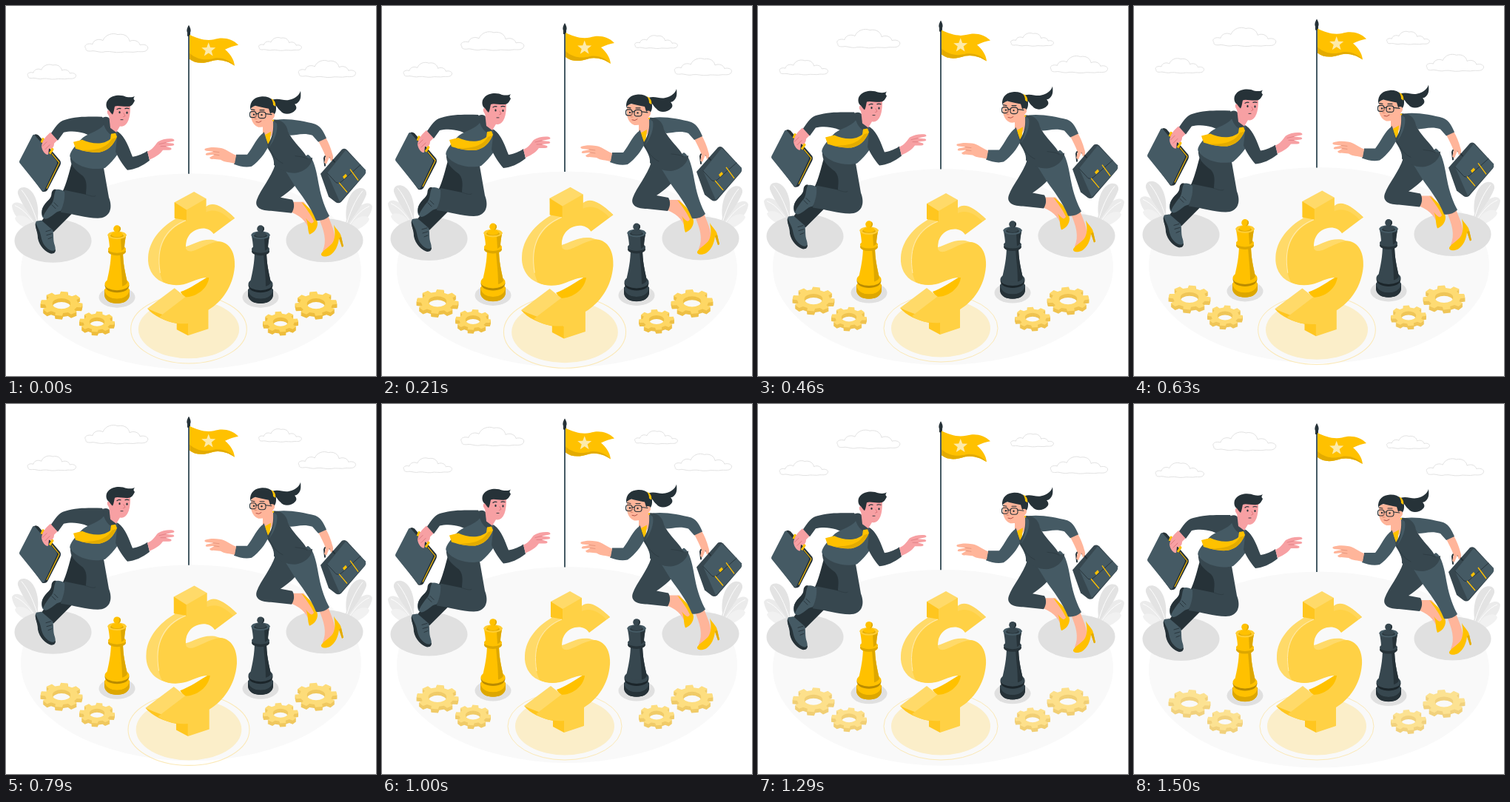
Write an HTML page that moves like this. It is 500x500 px and loops after 1540 ms.

```html
<!DOCTYPE html>
<html lang="en">
<head>
<meta charset="utf-8">
<title>Business race</title>
<style>
html,body{margin:0;width:100%;height:100%;overflow:hidden;background:#fff}
svg{display:block;width:100%;height:100%}
.ink{fill:#263238}.dark{fill:#37474f}.mid{fill:#455a64}
.gold{fill:#ffc100}.deep{fill:#e3ab00}
.his{fill:#f7a0a3}.her{fill:#ffb59a}
.line{fill:none;stroke:#263238;stroke-width:.9;stroke-linecap:round;stroke-linejoin:round}
.cloud{fill:#fff;stroke:#dedede;stroke-width:.9;vector-effect:non-scaling-stroke}
.shade{fill:#e0e0e0}
.y{--a:#ffc100;--b:#dda700;--c:#b98b00;--d:#ffcd33}
.k{--a:#37474f;--b:#263238;--c:#1b252a;--d:#455a64}
</style>
</head>
<body>
<svg viewBox="0 0 500 500">
<defs>
  <path id="cloud" class="cloud" d="M2 20C-2 15 5 12 11 14C12 8 20 6 25 9C28 1 38-2 45 1C54-1 60 4 61 10C67 7 74 10 75 15C82 13 88 17 85 21C83 25 76 24 72 24C64 26 56 23 49 25C41 26 36 23 28 24C22 26 16 23 11 23C6 24 1 23 2 20Z"/>
  <g id="plant">
    <path fill="#ebebeb" d="M42 303C25 300 9 284 8 270C11 263 21 266 27 272C36 280 42 291 45 300Z"/>
    <path fill="#f1f1f1" d="M44 308C30 304 13 294 12 287C16 280 28 284 34 291Z"/>
    <path fill="#e3e3e3" d="M47 303C39 291 22 271 16 254C15 246 23 243 30 247C41 254 45 272 43 288Z"/>
    <path fill="none" stroke="#fff" stroke-width=".9" d="M21 249C31 261 39 279 45 302M12 270C25 275 36 290 44 304"/>
  </g>
  <g id="king">
    <ellipse class="shade" cy="394" rx="24.5" ry="14"/>
    <path fill="var(--b)" d="M-17 383L-17 391C-16 406 16 406 17 391L17 383Z"/>
    <ellipse cy="385" rx="16.5" ry="11" fill="var(--a)"/>
    <path fill="var(--b)" d="M-16 387C-13 399 13 399 16 387L17 391C15 400 8 402 0 402S-15 400-17 391Z"/>
    <path fill="var(--c)" d="M-16.500 377C-17 391 17 391 16.500 377Z"/>
    <ellipse cy="376" rx="16.500" ry="8.500" fill="var(--a)"/>
    <path fill="var(--a)" d="M-8 330L8 330C8 348 11 360 14 374C9 381-9 381-14 374C-11 360-8 348-8 330Z"/>
    <path fill="var(--b)" d="M4 334L8 332C8 348 11 360 14 374C12 377 10 378 7 379C7 362 5 350 4 334Z"/>
    <ellipse cy="332" rx="12" ry="5.500" fill="var(--b)"/>
    <ellipse cy="329" rx="12" ry="5" fill="var(--a)"/>
    <path fill="var(--a)" d="M-12.500 309C-11 316-10 322-10 328C-6 333 6 333 10 328C10 322 11 316 12.500 309Z"/>
    <path fill="var(--b)" d="M5 314L12.500 309C11 316 10 322 10 328L6 331Z"/>
    <ellipse cy="310" rx="12.500" ry="5.500" fill="var(--d)"/>
    <path fill="var(--b)" d="M-9 311C-7 305 7 305 9 311C6 314-6 314-9 311Z"/>
    <ellipse cy="309" rx="8" ry="3.500" fill="var(--a)"/>
    <circle cy="301.500" r="4.800" fill="var(--a)"/>
    <path fill="var(--b)" d="M1 306C6 305 6 299 3 298C4 302 3 304 1 306Z"/>
  </g>
</defs>

<g id="scene">
  <ellipse cx="250" cy="359" rx="230" ry="132.5" fill="#f9f9f9"/>
  <use href="#cloud" transform="translate(106 38)"/>
  <use href="#cloud" transform="translate(28.5 79.5) scale(.77 .79)"/>
  <use href="#cloud" transform="translate(341 43) scale(.68 .7)"/>
  <use href="#cloud" transform="translate(394.5 74) scale(.91 .91)"/>
  <use href="#plant"/>
  <use href="#plant" transform="matrix(-1 0 0 1 503 1)"/>
  <ellipse class="shade" cx="63.5" cy="317.5" rx="52" ry="29.5"/>
  <ellipse class="shade" cx="430.5" cy="317" rx="52" ry="29.5"/>
  <g id="gears"></g>
  <use href="#king" class="y" x="150"/>
  <use href="#king" class="k" x="344"/>

  <g id="flag">
    <path stroke="#455a64" stroke-width="2" d="M247 36V227"/>
    <path class="ink" d="M247 26C250 31 250 34 249 36L249 41H245V36C244 34 244 31 247 26Z"/>
    <path class="gold" d="M248 39C258 44 270 48 281 45.500C293 42 305 44 314 53C308 54 302 56 296 59C303 65 308 72 309 81C300 75 290 72 280 74C268 78 257 79 248 72Z"/>
    <path class="deep" d="M248 64C258 73 270 74 281 71C292 69 303 74 309 81C300 75 290 72 280 74C268 78 257 79 248 72Z"/>
    <path id="star" fill="#fdeaa9"/>
  </g>

  <g id="man">
    <path class="ink" d="M89 212C85 226 82 240 76 252L48 291L64 306L110 260L118 224Z"/>
    <path class="mid" d="M41 291C37 297 43 304 44 313C45 323 53 331 60 334C66 336 68 331 66 324C63 316 65 309 63 303L48 290Z"/>
    <path class="ink" d="M40 293C39 300 43 305 43 314C45 325 54 333 61 335C66 335 67 332 67 329C64 333 59 331 54 326C47 319 48 310 45 304Z"/>
    <path class="line" d="M54 305L61 303M55 310L62 308M57 315L62 313"/>
    <path class="dark" d="M87 203C86 215 93 222 104 230C111 238 108 248 108 255L79 249L74 279C91 281 108 287 124 287C140 287 145 274 139 259L132 219Z"/>
    <path class="line" style="opacity:.45" d="M108 255C112 256 118 259 121 257"/>
    <path class="mid" d="M79 251C73 247 65 247 64 252C63 260 53 265 49 274C47 283 49 288 54 288C62 286 66 278 74 277C78 269 80 259 79 251Z"/>
    <path class="ink" d="M65 248C59 252 64 256 58 262C50 269 46 278 50 285C53 278 57 273 62 267C66 260 64 254 68 248Z"/>
    <path class="line" d="M62 269L67 274M65 266L70 271"/>

    <path class="ink" d="M37 175Q40 172 44 175L73 209Q75 212 73 216L56 249Q54 252 49 251L30 225Z"/>
    <path class="mid" d="M36 175Q38 173 40 176L68 209Q70 212 68 215L52 249Q50 252 48 249L19 213Q17 211 19 208Z"/>
    <path fill="none" stroke="#ffc100" stroke-width="1.100" d="M62 200L72 212L55 247"/>
    <path fill="none" stroke="#ffc100" stroke-width="3" stroke-linejoin="round" d="M48 185L50 180L63 194L59 200"/>
    <path class="his" d="M60 171C54 176 49 182 48 190C49 197 54 202 57 201L58 193C64 194 65 189 65 186L71 180Z"/>
    <path class="line" style="stroke:#d8747a" d="M49 190L55 184M53 194L59 188"/>
    <path class="dark" d="M61 172C67 164 71 156 80 154C96 149 114 150 130 150L140 166L122 181C108 170 91 168 78 171L70 182Z"/>

    <path class="mid" d="M132 161C126 169 114 171 104 178C93 189 84 200 87 205C97 219 119 223 134 219C147 208 157 194 160 181C157 173 149 168 141 165Z"/>
    <path class="dark" d="M131 151C136 149 139 151 141 154L150 171L143 175C136 171 131 163 131 151Z"/>
    <path class="gold" d="M142 173L148 172L150 177C145 189 137 196 126 198C112 199 101 195 94 193L91 184L103 181C116 187 132 188 141 180Z"/>
    <path class="deep" d="M149 178C145 189 137 196 126 198C117 198 108 197 101 195C116 196 135 194 143 180Z"/>
    <path class="dark" d="M151 170C162 178 166 192 171 204C179 203 187 199 191 196L194 209C184 217 174 221 164 222C157 214 151 204 148 197Z"/>
    <path class="his" d="M191 197C198 194 201 189 205 184C211 180 220 179 226 180Q229 182 226 183L216 185L226 186Q229 188 225 189L216 190L223 192Q225 195 220 195L212 195C208 201 202 204 194 208Z"/>
    <path class="line" style="stroke:#d8747a;stroke-width:.7" d="M207 187L216 185M209 190L216 190"/>

    <path class="his" d="M139 147L141 165L149 171L155 161Z"/>
    <path class="his" d="M140 136C139 152 147 163 156 163C165 162 168 151 168 135C160 128 147 128 140 136Z"/>
    <path class="his" d="M143 141C138 138 135 143 138 147C139 150 142 151 144 149Z"/>
    <path class="ink" d="M142 145L139 141C135 139 134 131 138 127C145 119 158 121 162 123C167 124 171 124 174 122C172 125 172 126 174 128C172 133 169 136 166 136C159 137 151 134 147 136C146 140 146 143 144 147Z"/>
    <path class="line" style="stroke-width:1.200" d="M150 140Q152 138 155 139M161 139Q163 138 166 139"/>
    <ellipse class="ink" cx="153.500" cy="144" rx="1.100" ry="1.600"/><ellipse class="ink" cx="163.500" cy="144.500" rx="1.100" ry="1.600"/>
    <path class="line" style="stroke:#d8747a" d="M159 145L161 149L158.500 150"/>
    <path class="line" d="M155 154L158 154"/>
  </g>

  <g id="woman">
    <path class="her" d="M385 265L402 265C411 275 419 286 420 294L411 306C407 294 402 286 386 279Z"/>
    <path class="gold" d="M399 265C410 272 420 283 421 294C421 301 416 307 410 309C407 302 409 294 405 287C411 294 414 296 416 291C412 282 405 273 399 265Z"/>
    <path class="dark" d="M364 214C358 233 344 248 339 262C335 273 346 277 358 277L386 280C390 274 390 267 387 262L371 259C383 251 393 242 402 229Z"/>
    <path class="her" d="M422 286L435 283C439 295 446 306 444 318L430 335L428 331C434 318 430 303 422 286Z"/>
    <path class="gold" d="M443 296C446 302 452 306 453 312L456 325L454 326L450 314C449 324 445 332 438 337C432 340 425 339 426 335C429 329 438 326 442 319C446 311 444 303 443 296Z"/>
    <path class="deep" d="M453 312L456 325L454 326L450 314Z"/>
    <path class="mid" d="M377 222L408 201C416 205 420 225 423 243C426 260 432 275 437 284C432 289 425 291 419 290C411 270 399 256 390 243Z"/>

    <path class="dark" d="M425 227L454 194Q458 192 461 195L486 222Q487 225 485 228L453 265Q449 268 445 265L436 258Z"/>
    <path class="mid" d="M434 226L459 195L486 222L486 226L451 265Z"/>
    <path class="line" d="M434 226L446 239Q449 241 453 238L479 215"/>
    <path fill="none" stroke="#ffc100" stroke-width="1.300" d="M450 239L461 252M465 221L476 236"/>
    <path class="gold" d="M455 231L459 227L461 230L457 234Z"/>
    <path class="line" style="stroke-width:2" d="M431 216L430 206Q431 201 436 203L444 211"/>
    <path class="her" d="M421 181L432 178C436 185 439 192 441 200C443 205 442 209 439 210L437 204L433 214L430 212L432 204C429 196 425 188 421 181Z"/>
    <path class="mid" d="M366 154C382 152 403 156 418 160C426 163 430 172 433 179L422 184L414 175C402 171 392 175 384 175Z"/>

    <path class="her" d="M347 158L361 154L364 168L352 185L347 176Z"/>
    <path class="gold" d="M347 176L358 170L356 189L352 192Z"/>
    <path class="dark" d="M361 154C369 153 379 157 381 170C387 182 397 191 403 199C407 205 408 208 414 205C414 215 403 225 390 226C379 226 369 221 362 215C363 207 358 199 352 190L346 178L348 170L354 187C360 178 362 168 361 154Z"/>
    <path class="mid" d="M361 155L366 159C368 168 363 182 355 192C361 181 363 169 361 155Z"/>
    <path class="line" style="opacity:.55" d="M355 191C361 202 364 208 374 213M391 203C397 204 404 204 407 207"/>
    <path class="mid" d="M349 171C339 177 334 191 326 201L311 201L308 214C316 217 324 219 332 217C343 209 350 199 354 191Z"/>
    <path class="her" d="M311 202C303 199 297 193 289 192C282 191 275 191 269 193Q267 195 271 196L281 197L271 199Q268 202 272 202L282 201L275 205Q276 208 280 207L290 208C296 212 302 211 309 213Z"/>
    <path class="line" style="stroke:#dd8870;stroke-width:.7" d="M280 197L288 198M281 201L288 202"/>

    <path class="ink" d="M360 127C369 124 375 129 383 127C391 125 396 121 398 115C399 124 398 128 393 132L390 133C393 136 393 139 391 141C386 147 375 148 371 142C366 138 366 133 360 133Z"/>
    <path class="her" d="M332 136C329 148 331 160 341 164C351 165 360 159 362 148L358 133Z"/>
    <path class="ink" d="M330 140C329 128 337 123 346 122.500C358 122 366 130 365 139C365 146 361 149 358 149L355 139C348 138 342 136 337 135C333 136 331 138 330 140Z"/>
    <path class="her" d="M357 146C361 142 365 147 362 151C360 154 358 154 357 153Z"/>
    <path class="gold" d="M358 125C363 127 365 132 364 136L361 134C361 130 360 128 358 125Z"/>
    <circle class="gold" cx="361" cy="155" r="1.200"/>
    <g class="line" style="stroke-width:1.100">
      <rect x="329.500" y="143" width="8.500" height="8" rx="3"/>
      <rect x="341" y="143.500" width="10" height="8.500" rx="3.500"/>
      <path d="M338 146L341 146M351 146L359 147M331 140L336 141M343 141L349 141"/>
    </g>
    <circle class="ink" cx="335" cy="147" r="1.200"/><circle class="ink" cx="345.500" cy="147.500" r="1.200"/>
    <path class="line" style="stroke:#dd8870" d="M338 148L336 153L339 153"/>
    <path class="line" style="stroke:#a8433c" d="M338 157Q342 159 345 156"/>
  </g>
</g>

<g id="coin">
  <ellipse cx="247" cy="435.500" rx="77" ry="45.500" fill="none" stroke="#fbe9b7" stroke-width="1"/>
  <ellipse cx="247" cy="435.500" rx="67" ry="39" fill="#fbeec9"/>
  <path fill="#ffda69" d="M254 253L270 262L270 274L246 290L243 326L243 374C235 378 221 377 212 373C198 367 192 353 193 340C194 318 210 300 229 289L228 267Z"/>
  <path fill="#ffda69" d="M243 326C254 323 264 315 280 317L290 320L262 336L244 335Z"/>
  <path fill="#ffc100" d="M236 386C248 382 262 372 274 365C277 380 262 395 242 395Z"/>
  <path fill="#ffda69" d="M192 408L228 381L243 393L209 420Q200 415 192 408Z"/>
  <path fill="#ffc61f" d="M192 408Q209 416 228 421L246 428L246 444L231 436L231 428C216 425 200 418 192 408Z"/>
  <path fill="#ffd145" d="M244 277L270 262L270 273C282 268 296 276 308 288L280 309C272 297 255 301 248 310C243 317 242 324 244 330C251 338 268 321 287 319C302 320 309 335 308 352C306 379 291 399 273 410L273 435L246 444L246 428C231 429 217 426 208 419L242 393C257 393 272 382 274 367C262 366 252 373 240 376C230 378 220 377 213 373C204 353 205 328 219 310C227 299 237 295 244 291Z"/>
  <path fill="#ffc61f" d="M228 267L244 277L244 291L228 288Z"/>
  <path fill="#ffd65b" d="M270 273C278 266 290 270 308 288L303 291C292 280 282 275 270 280Z"/>
  <path fill="none" stroke="#ffecb0" stroke-width="1" d="M243 291C215 302 203 326 209 361"/>
</g>
</svg>

<script>
const $ = id => document.getElementById(id);
const NS = 'http://www.w3.org/2000/svg';

function add(parent, d, fill) {
  const p = document.createElementNS(NS, 'path');
  p.setAttribute('d', d);
  p.setAttribute('fill', fill);
  p.setAttribute('fill-rule', 'evenodd');
  parent.append(p);
}

// Flat gear in perspective: eight teeth around an open hub
function gear(cx, cy, rx, flip) {
  const squash = .58, pts = [];
  for (let i = 0; i < 8; i++)
    for (const [turn, r] of [[-.24, .78], [-.17, 1], [.17, 1], [.24, .78]]) {
      const a = i * Math.PI / 4 + flip * .14 + turn;
      pts.push([cx + rx * r * Math.cos(a), rx * r * squash * Math.sin(a)]);
    }
  const h = rx * .43, v = h * squash;
  const ring = y => 'M' + pts.map(p => p[0].toFixed(1) + ' ' + (p[1] + y).toFixed(1)).join('L') +
    `ZM${cx - h} ${y}a${h} ${v} 0 1 0 ${2 * h} 0a${h} ${v} 0 1 0 ${-2 * h} 0Z`;
  for (let k = 5; k > 0; k--) add($('gears'), ring(cy + k - 2), '#eebd3c');
  add($('gears'), ring(cy - 2), '#ffd65c');
}
for (const [x, y, r] of [[75, 404.5, 28.5], [123, 429, 24]]) {
  gear(x, y, r, 1);
  gear(494 - x, y, r, -1);
}

const star = [...Array(10).keys()].map(i => {
  const r = i % 2 ? 4.2 : 10, a = i * Math.PI / 5 - Math.PI / 2;
  return (273.7 + r * Math.cos(a)).toFixed(1) + ' ' + (59.7 + r * Math.sin(a)).toFixed(1);
});
$('star').setAttribute('d', 'M' + star.join('L') + 'Z');

const LOOP = 1540, CYCLE = 1500, LEAD = 25;
const lift = [[0, 0], [.5, -10], [1, 0]];
const beat = [[0, 1], [.1, 1.1], [.3, 1], [.4, 1], [.5, 1.1], [.6, 1], [1, 1]];
const fade = [[0, 1], [1, .65]];

function at(steps, p) {
  const i = Math.max(1, steps.findIndex(s => s[0] >= p));
  const [p0, v0] = steps[i - 1], [p1, v1] = steps[i];
  return v0 + (v1 - v0) * (p - p0) / (p1 - p0);
}

function draw(now) {
  const t = now % LOOP;
  const p = Math.min(1, (LEAD + t * (CYCLE - LEAD) / CYCLE) / CYCLE);
  $('scene').setAttribute('transform', `translate(0 ${at(lift, p)})`);
  $('coin').setAttribute('transform', `translate(247 367) scale(${at(beat, p)}) translate(-247 -367)`);
  $('gears').setAttribute('opacity', at(fade, p));
}

const start = performance.now();
function tick() {
  draw(performance.now() - start);
  requestAnimationFrame(tick);
}
tick();
</script>
</body>
</html>
```
